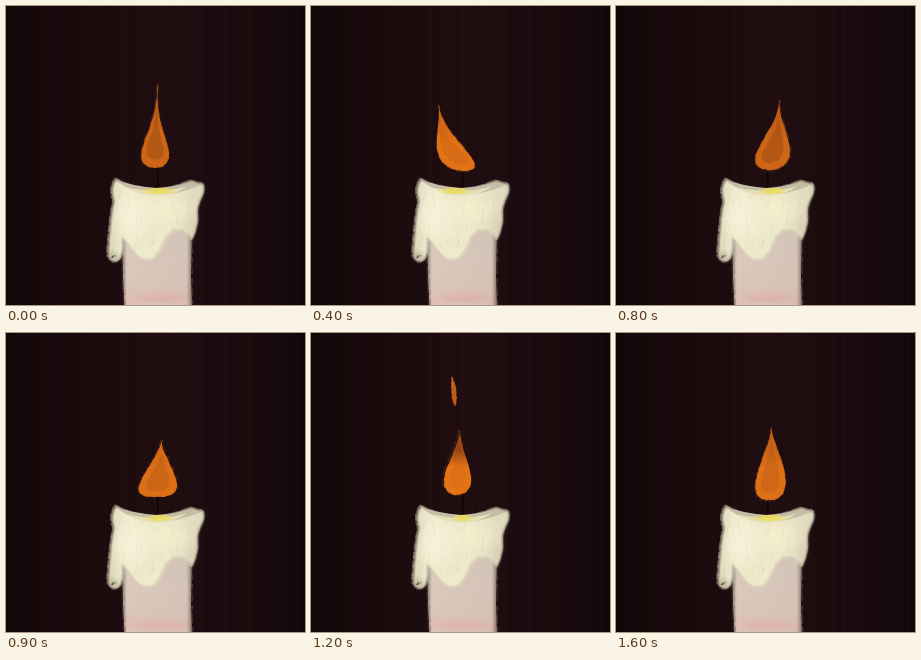
Write an HTML page with a canvas that moves like this. It is 299 px wide and 299 px high and loops after 1700 ms.

```html
<!DOCTYPE html>
<html lang="en">
<head>
<meta charset="utf-8">
<title>Candle</title>
<style>
html, body { margin: 0; width: 100%; height: 100%; overflow: hidden; background: #190b0d; }
canvas { display: block; width: 299px; height: 299px; }
</style>
</head>
<body>
<canvas id="stage" width="299" height="299"></canvas>
<script>
const SIZE = 299, STEP = 100, STEPS = 17, SPARK_STEP = 12;
const DULL = [202, 100, 22], BRIGHT = [236, 120, 24], SOOT = [140, 64, 18];
const ctx = document.getElementById('stage').getContext('2d');

// A flame is a teardrop on a curved spine from base to tip. round and taper
// shape its two ends, bend is the x the spine is pulled to, pool the lit wax.
const poses = [
  { at: 0, base: [149, 162], tip: [152, 79], bend: 149, half: 14, round: .5, taper: 2.8, glow: .1, soot: .3, pool: 20 },
  { at: 4, base: [153, 165], tip: [128, 99], bend: 130, half: 16, round: .4, taper: 1.9, glow: .7, soot: .2, pool: 18 },
  { at: 8, base: [153, 164], tip: [163, 94], bend: 163, half: 17, round: .5, taper: 2, glow: .1, soot: .2, pool: 16 },
  { at: 10, base: [147, 164], tip: [147, 122], bend: 148, half: 21, round: .15, taper: 1.1, glow: 1, soot: 0, pool: 17 },
  { at: 12, base: [146, 162], tip: [149, 98], bend: 147, half: 13.5, round: .5, taper: 1.7, glow: .8, soot: .9, pool: 12 },
  { at: 14, base: [149, 163], tip: [156, 61], bend: 151, half: 9, round: .5, taper: 1.4, glow: .5, soot: .6, pool: 11 },
  { at: 16, base: [153, 167], tip: [155, 94], bend: 157, half: 15, round: .4, taper: 1.5, glow: .6, soot: .3, pool: 20 }
];

const mix = (a, b, k) => Array.isArray(a) ? a.map((v, i) => mix(v, b[i], k)) : a + (b - a) * k;
const rgb = (c, a = 1) => `rgba(${c.map(Math.round)},${a})`;

function random(seed) {
  return () => (seed = (seed * 16807) % 2147483647) / 2147483647;
}

function gradient(g, x0, y0, x1, y1, ...stops) {
  const fill = g.createLinearGradient(x0, y0, x1, y1);
  stops.forEach(([k, c]) => fill.addColorStop(k, c));
  return fill;
}

function blob(g, x, y, rx, ry, color, blur) {
  g.save();
  g.filter = `blur(${blur}px)`;
  g.fillStyle = color;
  g.beginPath();
  g.ellipse(x, y, rx, ry, 0, 0, Math.PI * 2);
  g.fill();
  g.restore();
}

function softFill(g, path, color, blur) {
  g.save();
  g.filter = `blur(${blur}px)`;
  g.fillStyle = color;
  g.fill(path);
  g.restore();
}

// Thin broken strokes give the chalky edge.
function chalk(g, path, color, seed, width, count) {
  const rnd = random(seed);
  g.save();
  g.strokeStyle = color;
  g.lineWidth = width;
  for (let i = 0; i < count; i++) {
    g.setLineDash([3 + rnd() * 8, 1 + rnd() * 5]);
    g.save();
    g.translate(rnd() * 3 - 1.5, rnd() * 3 - 1.5);
    g.stroke(path);
    g.restore();
  }
  g.restore();
}

function paintBackground(g) {
  const rnd = random(71);
  g.fillStyle = gradient(g, 0, 0, SIZE, 0, [0, '#110709'], [.22, '#1a0b0d'],
    [.5, '#200e11'], [.8, '#1c0c0f'], [1, '#12080a']);
  g.fillRect(0, 0, SIZE, SIZE);
  for (let i = 0; i < 40; i++) {
    g.fillStyle = rnd() < .5 ? 'rgba(0,0,0,.07)' : 'rgba(70,25,28,.05)';
    g.fillRect(Math.floor(rnd() * SIZE), 0, 1 + rnd() * 6, SIZE);
  }
}

function paintBody(g) {
  const body = new Path2D('M116 205 H186 L185 270 L186 310 H119 L117 270 Z');
  softFill(g, body, gradient(g, 0, 215, 0, 299, [0, '#d8cabd'], [.75, '#dac7ba'], [.93, '#dfbdb4'], [1, '#dcc4b9']), .7);
  g.save();
  g.clip(body);
  g.fillStyle = gradient(g, 116, 0, 186, 0, [0, 'rgba(60,45,40,.5)'], [.07, 'rgba(90,75,70,0)'],
    [.92, 'rgba(90,75,70,.04)'], [1, 'rgba(60,45,40,.5)']);
  g.fillRect(110, 200, 80, 99);
  blob(g, 152, 293, 22, 3, 'rgba(224,165,165,.4)', 2);
  g.restore();
  chalk(g, body, 'rgba(120,104,96,.45)', 5, .8, 3);
}

function paintWax(g) {
  const rnd = random(19);
  const wax = new Path2D('M110 173 C122 180 136 183 150 184 C164 183 176 179 184 175 L197 178 ' +
    'Q200 182 196 191 Q190 202 192 212 Q191 224 186 234 C178 220 166 222 160 232 ' +
    'C154 246 150 254 142 254 C130 254 126 240 117 232 Q118 250 113 254 Q106 259 102 249 ' +
    'Q104 212 108 195 Q103 182 110 173 Z');
  softFill(g, wax, gradient(g, 100, 0, 200, 0, [0, '#d9d4b6'], [.18, '#efeacd'], [.6, '#efe9cb'], [1, '#dcd5ba']), .8);
  g.save();
  g.clip(wax);
  blob(g, 126, 210, 16, 22, 'rgba(246,243,218,.75)', 6);
  blob(g, 160, 204, 24, 10, 'rgba(245,240,206,.7)', 6);
  blob(g, 187, 222, 5, 12, 'rgba(200,190,170,.4)', 4);
  blob(g, 107, 251, 6, 5, 'rgba(165,160,136,.5)', 2);
  for (let i = 0; i < 60; i++) {
    const x = 102 + rnd() * 94, y = 180 + rnd() * 65;
    g.strokeStyle = rnd() < .5 ? 'rgba(255,255,238,.13)' : 'rgba(160,150,120,.1)';
    g.beginPath();
    g.moveTo(x, y);
    g.lineTo(x + rnd() * 8 - 4, y + 5 + rnd() * 11);
    g.stroke();
  }
  g.restore();
  chalk(g, wax, 'rgba(205,200,172,.45)', 8, .7, 4);

  // Far lip of the melted rim, with the hollow in front of it.
  softFill(g, new Path2D('M110 174 Q126 180 150 182 Q168 181 184 176 L195 179 Q172 189 148 189 Q124 187 110 174 Z'), '#c4bca6', .6);
  softFill(g, new Path2D('M120 181 Q136 185 151 185 Q171 184 181 180 Q171 189 151 190 Q129 188 120 181 Z'), '#e6dfb8', .6);

  // Dark specks at the foot of the long drip.
  g.fillStyle = 'rgba(55,45,38,.7)';
  for (let i = 0; i < 5; i++) g.fillRect(105 + rnd() * 5, 249 + rnd() * 5, 1.2, 1.2);

  g.strokeStyle = 'rgba(10,3,4,.75)';
  g.lineWidth = 2;
  g.stroke(new Path2D('M152 163 Q151 172 152 181'));
}

const scene = document.createElement('canvas');
scene.width = scene.height = SIZE;
[paintBackground, paintBody, paintWax].forEach(paint => paint(scene.getContext('2d')));

function poseAt(step) {
  const i = Math.max(1, poses.findIndex(p => p.at >= step));
  const a = poses[i - 1], b = poses[i], k = (step - a.at) / (b.at - a.at);
  const pose = {};
  for (const key in a) pose[key] = mix(a[key], b[key], k);
  return pose;
}

// size shrinks the width and rough sets the raggedness of the edge.
function teardrop({ base, tip, bend, half, round, taper }, rnd, size = 1, rough = .8) {
  const count = 24, peak = round / (round + taper);
  const profile = u => u ** round * (1 - u) ** taper;
  const left = [], right = [];
  for (let i = 0; i <= count; i++) {
    const u = (i / count) ** 2;
    const x = mix(mix(base[0], bend, u), mix(bend, tip[0], u), u);
    const y = mix(base[1], tip[1], u);
    const w = half * size * profile(u) / profile(peak);
    const fray = () => (rnd() - .5) * rough;
    left.push([x - w + fray(), y + fray()]);
    right.unshift([x + w + fray(), y + fray()]);
  }
  const path = new Path2D();
  [...left, ...right].forEach(p => path.lineTo(...p));
  path.closePath();
  return path;
}

function drawPool({ tip, pool }) {
  const mid = 152 + (tip[0] - 152) * .35, clear = 'rgba(236,220,105,0)', lit = 'rgba(236,220,95,.9)';
  ctx.fillStyle = gradient(ctx, mid - pool, 0, mid + pool, 0, [0, clear], [.35, lit], [.7, lit], [1, clear]);
  ctx.beginPath();
  ctx.ellipse(mid, 185, pool, 3, 0, 0, Math.PI * 2);
  ctx.fill();
}

function drawFlame(pose, step) {
  const { base, tip, glow, soot } = pose, rnd = random(311 + step * 97);
  const body = mix(DULL, BRIGHT, glow), top = mix(body, SOOT, soot);
  const path = teardrop(pose, rnd);
  ctx.fillStyle = gradient(ctx, 0, tip[1], 0, base[1], [0, rgb(top)], [.3, rgb(top)], [.55, rgb(body)], [1, rgb(body)]);
  ctx.fill(path);

  // Dull flames show a darker core in the bowl.
  const lift = (base[1] - tip[1]) * .1;
  const core = { ...pose, base: [base[0], base[1] - lift], tip: [tip[0], tip[1] + lift * 2] };
  ctx.fillStyle = rgb(SOOT, .45 * (1 - glow));
  ctx.fill(teardrop(core, rnd, .6));
  chalk(ctx, path, rgb(mix(body, SOOT, .3), .5), 31 + step, .6, 2);
}

function drawSpark() {
  const spark = { base: [144, 73], tip: [141, 43], bend: 143, half: 2.6, round: .6, taper: .8 };
  ctx.fillStyle = rgb(mix(DULL, SOOT, .2));
  ctx.fill(teardrop(spark, random(43)));
}

function draw(step) {
  const pose = poseAt(step);
  ctx.drawImage(scene, 0, 0);
  drawPool(pose);
  drawFlame(pose, step);
  if (step === SPARK_STEP) drawSpark();
}

let shown = -1;
function tick() {
  const step = Math.floor(performance.now() / STEP) % STEPS;
  if (step !== shown) draw(shown = step);
  requestAnimationFrame(tick);
}
tick();
</script>
</body>
</html>
```
